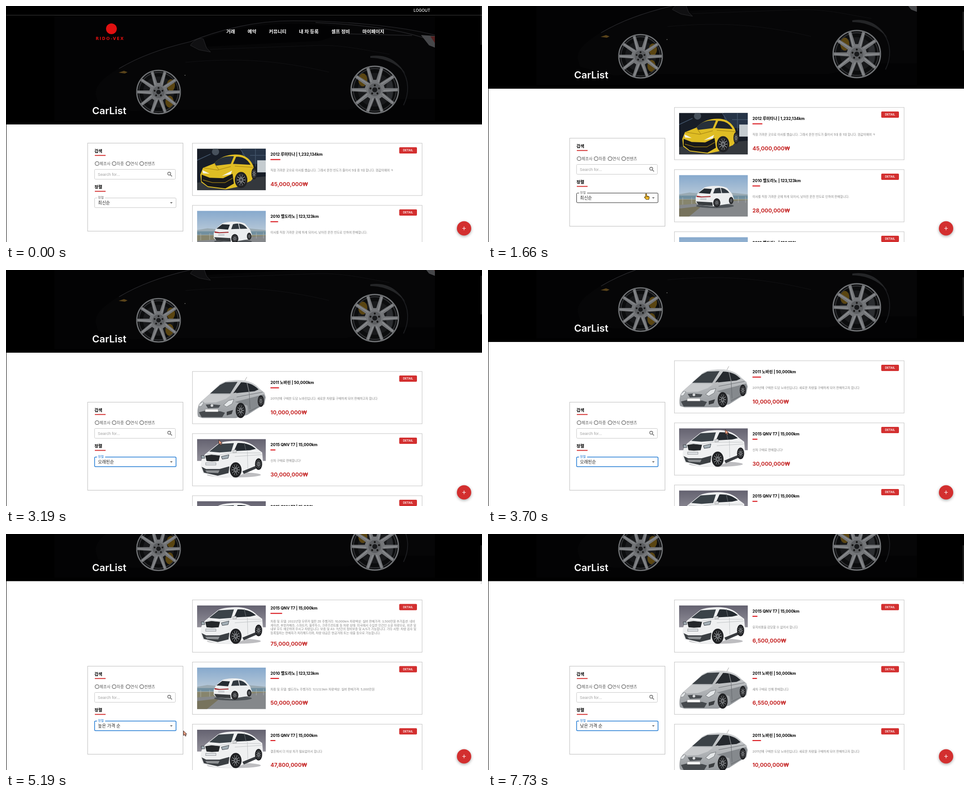
Recreate the animation shown at these times as an HTML page. Size 1061x528 px, loop 8890 ms.

```html
<!DOCTYPE html>
<html lang="ko">
<head>
<meta charset="utf-8">
<title>CarList</title>
<style>
html, body { margin: 0; width: 100%; height: 100%; overflow: hidden; background: #fff; }
svg { display: block; }
text { font-family: Inter, "Noto Sans CJK KR", "Noto Sans CJK JP", sans-serif; white-space: pre; }
.arial { font-family: "Liberation Sans", Arial, sans-serif; }
.shadow { filter: drop-shadow(0 2px 3px rgba(0,0,0,.35)); }
</style>
</head>
<body>
<svg id="stage" width="1061" height="528" viewBox="0 0 1061 528"></svg>
<script>
const LOOP = 8890, RED = '#d32f2f', BLUE = '#1976d2';
const OPENS = [2080, 4250, 6250], PICKS = [2760, 4860, 6800], LOADS = [2830, 4950, 6890];
const OPTIONS = ['최신순', '오래된순', '높은 가격 순', '낮은 가격 순'];
const SCROLL = [[0, 0], [1190, 14], [1260, 34], [1330, 55.5], [1410, 74], [1480, 80],
  [3650, 86], [3700, 104], [3780, 138], [3850, 156], [3920, 159.5]];
const POINTER = [[140, 944, 499], [1000, 352, 425], [1190, 352, 425], [1330, 353, 416], [1960, 352, 424],
  [2080, 330, 428], [2480, 283, 460], [2760, 283, 460], [3380, 529, 357], [3700, 529, 357],
  [4000, 386, 404], [4250, 310, 428], [4520, 302, 483], [4860, 302, 485], [5500, 480, 400],
  [5800, 480, 400], [6250, 292, 434], [6350, 284, 458], [6680, 292, 500], [6850, 292, 500],
  [7600, 862, 482], [7670, 1046, 385], [7730, 1064, 384]];

const rect = (x, y, w, h, fill, extra = '') =>
  `<rect x="${x}" y="${y}" width="${w}" height="${h}" fill="${fill}" ${extra}/>`;
const circle = (x, y, r, fill, extra = '') => `<circle cx="${x}" cy="${y}" r="${r}" fill="${fill}" ${extra}/>`;
const ellipse = (x, y, rx, ry, fill) => `<ellipse cx="${x}" cy="${y}" rx="${rx}" ry="${ry}" fill="${fill}"/>`;
const path = (d, fill, extra = '') => `<path d="${d}" fill="${fill}" ${extra}/>`;
const line = (d, color, width = 1) => path(d, 'none', `stroke="${color}" stroke-width="${width}"`);
const text = (s, x, y, size, fill = '#000', weight = 400, extra = '') =>
  `<text x="${x}" y="${y}" font-size="${size}" fill="${fill}" font-weight="${weight}" ${extra}>${s}</text>`;
const group = (id, body, extra = '') => `<g id="${id}" ${extra}>${body}</g>`;
const spin = (n, shape) => Array.from({ length: n }, (_, k) => `<g transform="rotate(${k * 360 / n})">${shape}</g>`).join('');

// Alloy wheel of radius 50 scaled to rx, ry
const wheel = (x, y, rx, ry, back = '', rim = '#737578') =>
  `<g transform="translate(${x} ${y}) scale(${rx / 50} ${ry / 50})">` +
  circle(0, 0, 50, '#0c0d0e') + circle(0, 0, 34, '#18191b') + back +
  circle(0, 0, 47.5, 'none', `stroke="${rim}" stroke-width="2.5"`) +
  circle(0, 0, 43, 'none', 'stroke="#303134" stroke-width="2"') +
  spin(5, path('M-8-8L-17-43L-11-45L-3-20H3L11-45L17-43L8-8Z', rim) + line('M-7-16L-14-43M7-16L14-43', '#9b9da0', 1)) +
  circle(0, 0, 13, '#5d5f62') + spin(5, circle(0, -9, 2, '#161616')) + circle(0, 0, 5, '#1a1b1d') + '</g>';
const tyre = (x, y, rx, ry) => ellipse(x, y, rx, ry, '#202124') + wheel(x, y, rx * .74, ry * .74, '', '#85888c');

const PICS = {
  yellow: rect(0, 0, 153, 93, '#171d27') + rect(100, 0, 53, 34, '#263447') + circle(41, 7, 8, '#47515c') +
    line('M0 26L30 12M96 0L112 26M130 0V40M118 15H153', '#42546a', 1.5) +
    rect(134, 26, 19, 27, '#c5ccd0') + path('M0 76L153 62V93H0Z', '#34383d') +
    path('M7 58L13 43L38 33C52 18 67 13 88 13C107 13 119 24 125 38L130 59L120 72L88 86L64 91L24 86L9 75Z', '#dfbd24') +
    path('M39 32C50 20 62 16 82 17L75 34L42 38Z', '#26303a') +
    path('M80 34L87 18C105 17 114 27 119 36Z', '#1d242c') +
    path('M10 58L28 65L58 66L79 56L82 78L63 89L24 84L10 73Z', '#17181a') +
    path('M12 48L28 56L13 55ZM55 61L78 49L75 57Z', '#f5f4e7') +
    line('M14 43L46 48L75 40M49 48L39 34M84 39L126 42M13 70L34 76L62 76L79 66', '#a98714', 1.2) +
    tyre(98, 70, 14, 18) + tyre(127, 56, 6, 13),
  coast: rect(0, 0, 153, 93, 'url(#sky)') + path('M0 43L23 39L55 42L90 37L153 43V55H0Z', '#9aaab3') +
    rect(0, 46, 153, 9, '#718f9f') + path('M0 54H153V70H0Z', '#87856d') + path('M0 67L153 56V93H0Z', '#85888b') +
    path('M0 75L51 69L22 93H0Z', '#77735d') + line('M0 54H153M8 50V66M28 50V65M132 48V62M148 48V62', '#b8bbb8', .8) +
    ellipse(80, 69, 42, 5, '#4e5357') +
    path('M37 50L42 40L56 28C70 23 95 23 107 29L118 42L122 53L118 63L77 70L43 67L37 61Z', '#eceeef') +
    path('M43 40L56 30L73 31L69 42Z', '#252c32') + path('M76 41L80 30C95 26 105 30 112 40Z', '#30383f') +
    line('M92 28L95 41', '#eceeef', 1.5) + path('M39 46L50 48L70 47V49L49 50L39 49Z', '#9c2025') +
    path('M38 59L74 61L75 69L43 67Z', '#393d40') + rect(47, 52, 14, 4, '#c9ced1') +
    tyre(84, 62, 8, 10) + tyre(116, 57, 5, 8),
  sedan: rect(0, 0, 153, 93, '#fff') + line('M106 9L111 0', '#777', .7) +
    path('M1 84C0 72 2 62 10 54L28 38L50 17C58 10 72 7 92 7C114 7 129 14 140 27L150 35L153 45L150 62L134 71L112 85L86 92L12 92L2 89Z', 'url(#silver)') +
    path('M9 55L28 39L76 40L64 49L42 57L17 58Z', '#c9cbcd') +
    path('M84 56L149 39L152 46L149 60L115 81L112 64Z', '#85898d') +
    path('M29 37L51 18L63 12L90 11L74 37Z', '#3c4247') +
    path('M80 37L98 12C114 12 126 17 137 28L128 32Z', '#25292e') + line('M111 13L116 34', '#8b8e91', 1.5) +
    path('M19 62L30 61L52 63L48 69L24 70Z', '#4b4f53') + circle(33, 64, 3, '#d6d8da') +
    path('M59 63L70 53L82 50L78 60L66 67Z', '#e3e6e8', 'stroke="#585c60" stroke-width=".8"') +
    path('M4 62L11 56L15 57L10 65L4 67Z', '#e3e6e8', 'stroke="#585c60" stroke-width=".6"') +
    path('M4 79L16 76L52 77L62 80L56 90L10 90Z', '#45494d') + rect(18, 72, 29, 6, '#f7f7f7', 'stroke="#777" stroke-width=".6"') +
    path('M66 78L80 74L77 83L66 86Z', '#3a3d40') +
    line('M88 45L146 34M116 34L118 72M116 77L146 62', '#5f6367', .9) + path('M78 37l9-2 2 6-9 2z', '#b8babc') +
    tyre(97, 75, 11, 17) + tyre(142, 54, 7, 13),
  white: rect(0, 0, 153, 93, '#fff') + rect(0, 0, 153, 49, 'url(#studio)') +
    ellipse(82, 80, 60, 6, '#bdbdc0') +
    path('M8 66C7 50 10 39 24 29L46 11C55 6 70 4 92 4C112 5 125 12 133 21L145 30L147 52L138 64L104 78L78 86L40 84L13 77Z', '#eff0f1') +
    path('M27 28L48 11L82 9L76 28L50 30Z', '#3b4349') +
    path('M82 27L90 9C108 8 120 13 131 22L118 25Z', '#252b31') + line('M105 9L109 26', '#565b60', 1.5) +
    path('M18 37L32 35L51 37L48 49L33 50L21 49Z', '#24272a') +
    path('M9 37L16 37L17 43L10 43ZM54 39L71 35L69 43L56 45Z', '#a5b0b7', 'stroke="#3c4248" stroke-width="1"') +
    path('M10 62L20 67H50L72 61L70 76L46 82L15 75Z', '#3b3f43') + rect(19, 53, 23, 5, '#dfe2e5', 'stroke="#5c6064" stroke-width=".6"') +
    path('M18 70H50L47 76L22 75Z', '#8e9194') + path('M101 72L133 59L136 64L104 78Z', '#393c40') +
    line('M21 33L48 36L75 31L142 31M84 39L144 35M112 27L113 66', '#b3b6b9', .8) +
    path('M79 25l8-1 1 6-8 1z', '#d8dadc', 'stroke="#777" stroke-width=".5"') +
    tyre(86, 69, 13, 17) + tyre(137, 56, 8, 13)
};

const LISTS = [
  [['yellow', '2012 루미타나 | 1,232,134km', 22, '직장 가까운 곳으로 이사를 했습니다. 그래서 운전 빈도가 줄어서 5대 중 1대 합니다. 껌값이에여 ㅋ', '45,000,000'],
   ['coast', '2010 벨도라노 | 123,123km', 17, '이사를 직장 가까운 곳에 하게 되어서, 낮아진 운전 빈도로 인하여 판매합니다.', '28,000,000'],
   ['coast', '2010 벨도라노 | 126,123km', 17, '', '']],
  [['sedan', '2011 노바린 | 50,000km', 19, '2011년에 구매한 도담 노바린입니다. 새로운 차량을 구매하게 되어 판매하고자 합니다', '10,000,000'],
   ['white', '2015 QNV T7 | 15,000km', 11, '신차 구매로 판매합니다!', '30,000,000'],
   ['white', '2015 QNV T7 | 15,000km', 11, '신차 구매로 인해 판매합니다', '30,000,000']],
  [['white', '2015 QNV T7 | 15,000km', 26, '차종 및 모델: 2022년형 모루카 델핀 ZE 주행거리: 10,000km 차량색상: 실버 판매가격: 3,500만원 추가옵션: 네비\n게이션, 후방카메라, 스마트키, 블루투스, 크루즈컨트롤 등 차량 상태: 미국에서 수입한 민간인 소유 차량으로, 외관 및\n내부 모두 깨끗하며 무사고 차량입니다. 보증 및 AS: 1년간의 정비보증 및 A/S가 가능합니다. 기타 사항: 차량 검사 및\n등록절차는 판매자가 처리해드리며, 차량 대금은 현금거래 또는 대출 등으로 가능합니다.', '75,000,000'],
   ['coast', '2010 벨도라노 | 123,123km', 19, '차종 및 모델: 벨도라노 주행거리: 123,123km 차량색상: 실버 판매가격: 5,000만원', '50,000,000'],
   ['white', '2015 QNV T7 | 15,000km', 11, '결혼해서 더 이상 차가 필요없어서 합니다', '47,800,000']],
  [['white', '2015 QNV T7 | 15,000km', 11, '유지비용을 감당할 수 없어서 합니다', '6,500,000'],
   ['sedan', '2011 노바린 | 50,000km', 10, '새차 구매로 인해 판매합니다', '6,550,000'],
   ['sedan', '2011 노바린 | 50,000km', 19, '2011년에 구매한 도담 노바린입니다. 새로운 차량을 구매하게 되어 판매하고자 합니다', '10,000,000']]
];

function card([pic, title, bar, desc, price], i) {
  const rows = desc.split('\n'), lift = rows.length > 1 ? 6.5 : 0;
  return `<g transform="translate(0 ${307 + i * 139})">` +
    rect(415.5, 0, 512, 117, '#fff', 'stroke="#c2c2c2"') +
    `<svg x="426" y="12.2" width="153" height="93" viewBox="0 0 153 93">${PICS[pic]}</svg>` +
    text(title, 589.5, 28 - lift, 8.75, '#000', 700) +
    rect(589.5, 35.5 - lift, bar, 2.2, '#d9141b') +
    rows.map((s, k) => text(s, 589.5, 63 - lift * 1.85 + k * 8.5, 6.77, '#838383')).join('') +
    (price && text(price + '₩', 589.5, 95.5 + lift, 12.1, '#c62828', 700)) +
    rect(876.5, 9, 39.5, 14, RED, 'rx="2"') +
    text('DETAIL', 896.2, 18.3, 6.4, '#fff', 600, 'text-anchor="middle"') + '</g>';
}

const nav = [['거래', 491], ['예약', 538.5], ['커뮤니티', 586], ['내 차 등록', 653], ['셀프 정비', 725], ['마이페이지', 794.5]];
const caliper = (x, y) => ellipse(x, y, 9, 13, '#5a4512');
const hero = rect(0, 0, 1061, 265, '#000') + rect(108, 21, 848, 236, '#030304') +
  path('M200 198C198 174 225 151 290 119C330 99 375 87 410 80C480 51 560 33 640 33C740 33 870 43 956 65V208H880L760 232H390L280 235L205 216Z', '#060607') +
  path('M420 82C490 50 570 40 640 40C690 40 740 44 772 54L700 78L445 91Z', '#020203') +
  line('M252 140C300 111 355 93 410 80C480 51 560 33 640 33C740 33 870 43 956 65', '#2c2c30', 1.2) +
  line('M690 37C800 42 880 53 939 74M748 62L905 66', '#252528', 1.5) +
  path('M411 88C418 76 432 70 440 74L447 94L456 103L430 98Z', '#101012', 'stroke="#29292c"') +
  line('M455 97L700 88C760 88 800 99 855 108M400 126C520 115 610 122 720 148', '#121214', 1) +
  path('M812 112C848 107 872 122 890 151L879 140C860 123 835 116 812 116Z', '#242527') +
  line('M882 142C899 165 899 196 886 222', '#1c1d20', 2) +
  path('M925 65L956 67V93L943 88Z', '#46474a') + path('M946 68H956V83Z', '#542020') +
  path('M251 149L263 145L271 148L265 151Z', '#59431a') + circle(399, 155, 1, '#777') +
  wheel(340, 192.5, 51, 51, caliper(27, -15) + caliper(24, 21)) +
  wheel(822, 187.5, 55.5, 55.5, caliper(-24, -20) + ellipse(30, 0, 7, 22, '#2b2d30')) +
  rect(0, 20, 1061, 1, '#3c3c3c') + text('LOGOUT', 908.5, 13, 8.8, '#fff', 500) +
  circle(235, 51, 12, '#e01010') +
  text('RIDO-VEX', 200, 75.5, 9, '#e01010', 700, 'style="font-family:DejaVu Sans,sans-serif" letter-spacing="1.9"') +
  nav.map(([s, x]) => text(s, x, 61, 10.6, '#fff', 700)).join('') +
  text('CarList', 192, 242, 22.1, '#fff', 600);

const heading = (s, y) => text(s, 197, y, 9.6, '#000', 700) + rect(198, y + 5.8, 24, 2, RED);
const radios = [['제조사', 203], ['차종', 241], ['연식', 272], ['컨텐츠', 302.5]].map(([s, x]) =>
  circle(x, 352.5, 4.3, '#fff', 'stroke="#444" stroke-width="1.1"') + text(s, x + 5.6, 355.8, 8.8, '#555')).join('');
const panel = rect(182, 306.8, 212.5, 197, '#fff', 'stroke="#b8b8b8"') +
  heading('검색', 327.5) + radios +
  rect(197.5, 365.5, 180, 22, '#fff', 'rx="2" stroke="#c8c8c8"') +
  text('Search for...', 204.5, 379.5, 9.2, '#a2a2a2', 400, 'class="arial"') +
  circle(363.8, 375, 3.3, 'none', 'stroke="#666" stroke-width="1.4"') + line('M366.3 377.5L370 381.2', '#666', 1.6) +
  heading('정렬', 407.8) +
  rect(197.5, 429.5, 181.5, 21.5, '#fff', 'id="box" rx="2"') + rect(203, 427, 18, 5, '#fff') +
  text('정렬', 205, 431, 7, '#666', 400, 'id="label"') +
  text('', 205, 443.8, 9.7, '#222', 350, 'id="value"') + path('M-3-1.5H3L0 1.5Z', '#666', 'id="caret"');

const menu = rect(253, 430, 70, 90, '#fff', 'rx="2" class="shadow"') +
  OPTIONS.map((s, i) => rect(253, 433.5 + i * 20.5, 70, 20.5, 'none', `id="row${i}"`) +
    text(s, 263, 447.3 + i * 20.5, 9.7, '#222', 350)).join('');

const arrow = path('M0 0V10.5L2.5 8.3L4.2 12L6 11.2L4.3 7.6H7.5Z', '#f0a184', 'stroke="#3a2520" stroke-width="1" stroke-linejoin="round"');
const hand = path('M-1.3 1C-1.3-.6 1.2-.6 1.3 1V5L5.5 5.8C7 6.2 7 7.4 6.8 9L6 12.5H.2L-3.6 8.2C-4.4 7-3 6-1.3 7.3Z', '#fbc02d', 'stroke="#4a3300" stroke-width="1.1"') +
  line('M1.5 5V8M3.6 5.6V8', '#4a3300', .7);

const gradient = (id, a, b) => `<linearGradient id="${id}" x2="0" y2="1"><stop stop-color="${a}"/><stop offset="1" stop-color="${b}"/></linearGradient>`;
const stage = document.getElementById('stage');
stage.innerHTML = `<defs>${gradient('sky', '#86a9cd', '#e9e8e3')}${gradient('silver', '#d0d2d4', '#94989c')}${gradient('studio', '#646270', '#92909a')}</defs>` +
  rect(0, 0, 1061, 528, '#fff') +
  group('page', hero + LISTS.map((cards, i) => group('list' + i, cards.map(card).join(''))).join('')) +
  group('panel', panel) + rect(0, 0, 1, 528, '#000') +
  rect(1058, 0, 2.5, 87, '#8884', 'id="bar" rx="1"') +
  circle(1021, 497.5, 16, RED, 'class="shadow"') + line('M1017 497.5H1025M1021 493.5V501.5', '#fff', 1.2) +
  group('menu', menu) + group('pointer', group('arrow', arrow) + group('hand', hand));

const el = id => document.getElementById(id);
const set = (id, attrs) => { for (const k in attrs) el(id).setAttribute(k, attrs[k]); };
const show = (id, on) => set(id, { visibility: on ? 'inherit' : 'hidden' });
const clamp = v => Math.max(0, Math.min(1, v));
const passed = (times, t) => times.filter(v => t >= v).length;

function pointerAt(t) {
  const i = Math.max(1, POINTER.findIndex(k => k[0] > t));
  const [a, x, y] = POINTER[i - 1], [b, u, v] = POINTER[i];
  const p = clamp((t - a) / (b - a)), e = p * p * (3 - 2 * p);
  return [x + (u - x) * e, y + (v - y) * e];
}

function draw(t) {
  const scroll = SCROLL[passed(SCROLL.map(k => k[0]), t) - 1][1];
  const opened = passed(OPENS, t), chosen = passed(PICKS, t), list = passed(LOADS, t);
  const open = opened > chosen, focused = opened > 0;
  const age = t - (open ? OPENS : PICKS)[opened - 1];
  const fade = !focused ? 0 : open ? clamp(age / 230) : 1 - clamp(age / 200);
  const grow = open ? 1 - (1 - clamp(age / 150)) ** 2 : fade;
  const sx = .75 + .25 * grow, sy = sx * sx;
  const panelY = Math.max(-scroll, -11);

  set('page', { transform: `translate(0 ${-scroll})` });
  LISTS.forEach((_, i) => show('list' + i, i === list));
  set('panel', { transform: `translate(0 ${panelY})` });
  set('bar', { y: scroll * .157 });
  show('bar', !open);

  const live = t >= POINTER[0][0] && t < 7730;
  const [x, y] = pointerAt(t);
  const inMenu = fade > 0 && x > 253 && x < 323 && y > 430 && y < 520;
  const inSelect = fade === 0 && x > 197 && x < 379 && y > 425 + panelY && y < 451 + panelY;
  const isHand = live && (inMenu || inSelect);
  set('pointer', { transform: `translate(${x} ${y})` });
  show('pointer', live);
  show('arrow', live && !isHand);
  show('hand', isHand);

  set('box', { stroke: focused ? BLUE : isHand ? '#222' : '#c4c4c4', 'stroke-width': focused ? 1.5 : 1 });
  set('label', { fill: focused ? BLUE : '#666' });
  el('value').textContent = OPTIONS[chosen];
  set('caret', { transform: `translate(368.5 440.5) scale(1 ${open ? -1 : 1})` });

  show('menu', fade > 0);
  set('menu', { opacity: fade, transform: `translate(288 430) scale(${sx} ${sy}) translate(-288 -430)` });
  const hover = inMenu && grow === 1 ? Math.floor((y - 433.5) / 20.5) : -1;
  OPTIONS.forEach((_, i) => set('row' + i, { fill: i === chosen ? '#d1e4f6' : i === hover ? '#f3f3f3' : 'none' }));
}

function tick() {
  draw(performance.now() % LOOP);
  requestAnimationFrame(tick);
}
tick();
</script>
</body>
</html>
```
